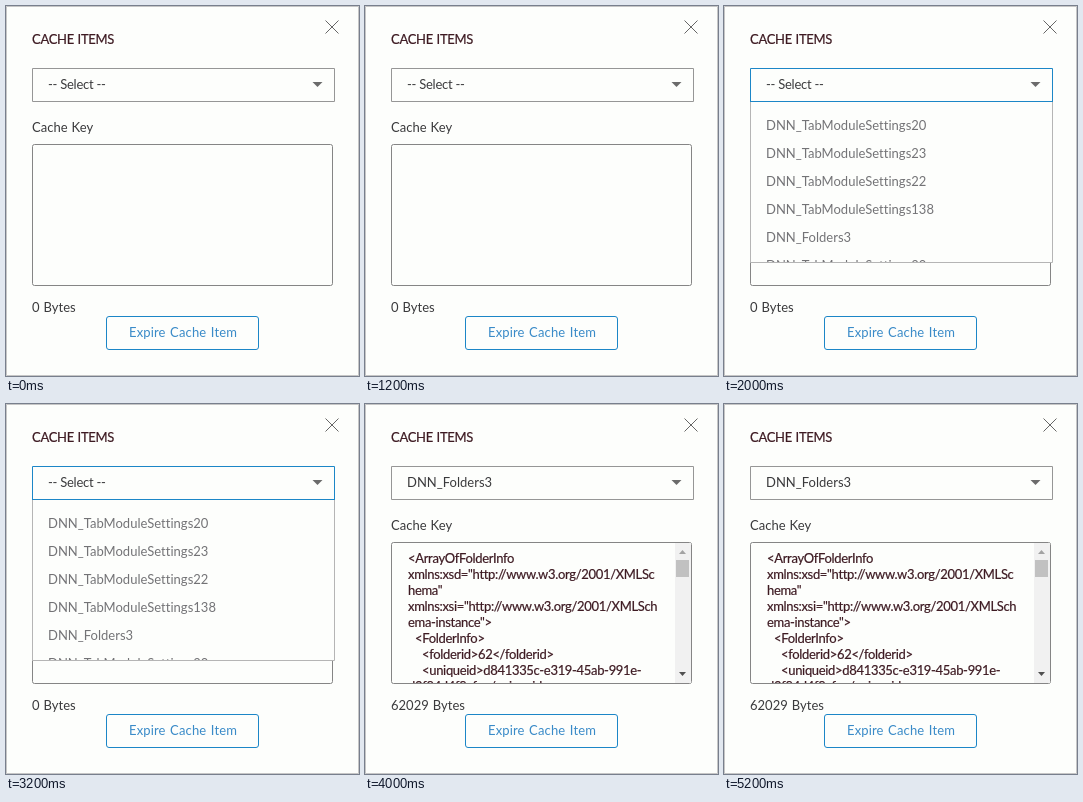
Write an HTML page with a canvas that moves like this. It is 353 px wide and 370 px high and loops after 6000 ms.

```html
<!DOCTYPE html>
<html lang="en">
<head>
<meta charset="utf-8">
<title>Cache items</title>
<style>
  html, body { margin: 0; width: 100%; height: 100%; overflow: hidden; background: #fdfefc; }
  canvas { display: block; width: 353px; height: 370px; }
</style>
</head>
<body>
<canvas id="stage"></canvas>
<script>
const W = 353, H = 370, STEP = 2000;
const BLUE = '#1c86c7', INK = '#3a3a3c', MAROON = '#3d1a22', PAPER = '#fdfefc';
const canvas = document.getElementById('stage');
const ctx = canvas.getContext('2d');
const ratio = window.devicePixelRatio || 1;
canvas.width = W * ratio;
canvas.height = H * ratio;
ctx.scale(ratio, ratio);

const items = ['TabModuleSettings20', 'TabModuleSettings23', 'TabModuleSettings22',
  'TabModuleSettings138', 'Folders3', 'TabModuleSettings20'].map(name => 'DNN_' + name);

// Each entry: indent, text
const xml = [
  [0, '<ArrayOfFolderInfo'],
  [0, 'xmlns:xsd="http://www.w3.org/2001/XMLSc'],
  [0, 'hema"'],
  [0, 'xmlns:xsi="http://www.w3.org/2001/XMLSch'],
  [0, 'ema-instance">'],
  [1, '<FolderInfo>'],
  [2, '<folderid>62</folderid>'],
  [2, '<uniqueid>d841335c-e319-45ab-991e-'],
  [0, 'd2f84d4f8cfa</uniqueid>']
];

// A non-zero letter spacing also keeps ligatures off.
function text(str, x, y, color = INK, { spacing = 0.02, gap = 0.7, weight = 0 } = {}) {
  ctx.font = '13px Lato, sans-serif';
  ctx.letterSpacing = spacing + 'px';
  ctx.wordSpacing = gap + 'px';
  ctx.fillStyle = ctx.strokeStyle = color;
  ctx.fillText(str, x, y);
  if (weight) {
    ctx.lineWidth = weight;
    ctx.strokeText(str, x, y);
  }
}

function box(x, y, w, h, stroke, radius = 0, fill = PAPER) {
  ctx.beginPath();
  ctx.roundRect(x + 0.5, y + 0.5, w - 1, h - 1, radius);
  ctx.fillStyle = fill;
  ctx.fill();
  ctx.lineWidth = 1;
  ctx.strokeStyle = stroke;
  ctx.stroke();
}

function triangle(cx, y, half, height, color) {
  ctx.beginPath();
  ctx.moveTo(cx - half, y);
  ctx.lineTo(cx + half, y);
  ctx.lineTo(cx, y + height);
  ctx.fillStyle = color;
  ctx.fill();
}

function clipped(x, y, w, h, paint) {
  ctx.save();
  ctx.beginPath();
  ctx.rect(x, y, w, h);
  ctx.clip();
  paint();
  ctx.restore();
}

function drawClose() {
  ctx.beginPath();
  ctx.moveTo(319.5, 14.5);
  ctx.lineTo(332.5, 27.5);
  ctx.moveTo(332.5, 14.5);
  ctx.lineTo(319.5, 27.5);
  ctx.lineWidth = 1;
  ctx.strokeStyle = '#666';
  ctx.stroke();
}

function drawXml() {
  clipped(27, 139, 283, 140, () => xml.forEach(([indent, line], i) =>
    text(line, 43 + indent * 7, 159 + i * 16, MAROON, { spacing: -0.32, gap: 0, weight: 0.2 })));
  ctx.fillStyle = '#f1f1f1';
  ctx.fillRect(310, 139, 16, 140);
  ctx.fillStyle = '#c1c1c1';
  ctx.fillRect(311, 156, 13, 17);
  triangle(317.5, 150, 3.5, -4, '#a3a3a3');
  triangle(317.5, 268, 3.5, 4, '#505050');
}

function drawList() {
  box(26, 95, 303, 162, '#b5b5b5');
  ctx.fillStyle = BLUE;
  ctx.fillRect(26, 95, 303, 1);
  clipped(27, 97, 301, 159, () => items.forEach((item, i) =>
    text(item, 42, 124 + i * 28, '#737376')));
}

function draw(state) {
  const open = state === 1, chosen = state === 2;
  box(0, 0, W, H, '#c6c6c6');
  text('CACHE ITEMS', 26, 38, MAROON, { spacing: -0.3, weight: 0.2 });
  drawClose();

  box(26, 62, 303, 34, open ? BLUE : '#969696');
  if (chosen) text(items[4], 42, 83);
  else text('-- Select --', 42, 83, INK, { spacing: -0.25, gap: 0 });
  triangle(311.5, 76, 5, 5, '#6b6b6b');

  text('Cache Key', 26, 126);
  box(26, 138, 301, 142, '#858585', 2);
  if (chosen) drawXml();
  text(chosen ? '62029 Bytes' : '0 Bytes', 26, 306);
  if (open) drawList();

  box(100, 310, 153, 34, BLUE, 2.5);
  text('Expire Cache Item', 123, 331, '#3a8bc8', { spacing: 0.15, gap: 1 });
}

function tick() {
  draw(Math.floor(performance.now() / STEP) % 3);
  requestAnimationFrame(tick);
}
tick();
</script>
</body>
</html>
```
